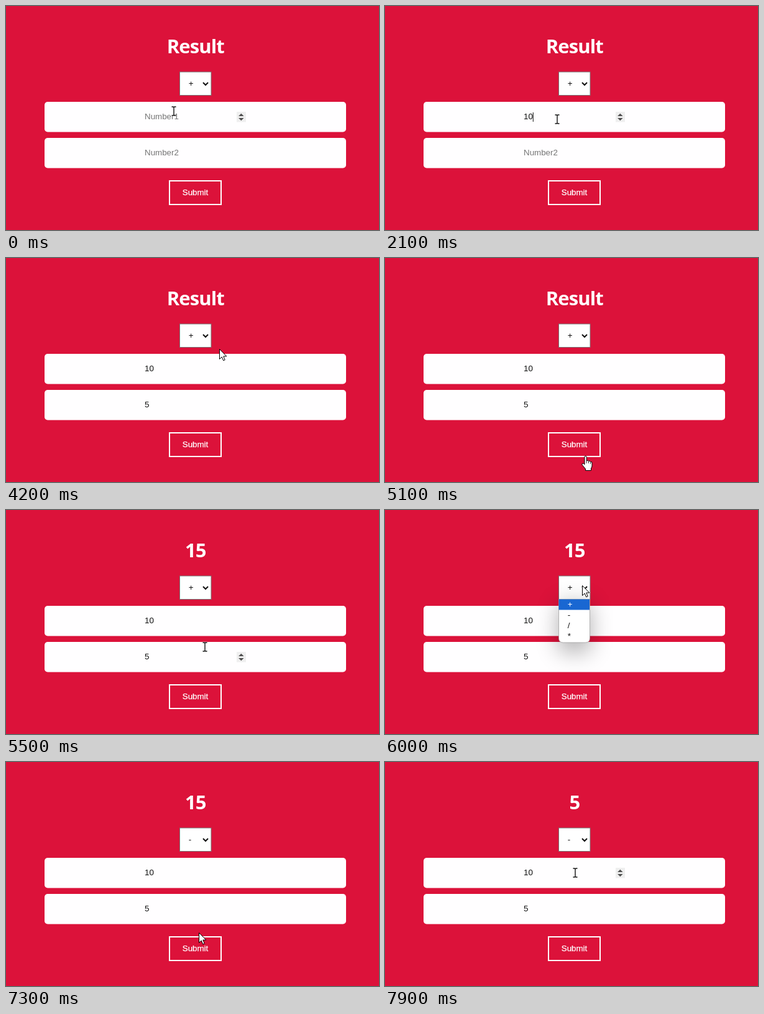
An HTML page that plays this animation: 600 px wide and 360 px high, repeating every 8 s.

```html
<!DOCTYPE html>
<html lang="en">
<head>
<meta charset="utf-8">
<title>Calculator</title>
<style>
  html, body { margin: 0; width: 100%; height: 100%; overflow: hidden; background: #dc123a; }
  svg { display: block; width: 600px; height: 360px; }
  text { font: 13.333px "Liberation Sans", Arial, sans-serif; fill: #111; white-space: pre; }
  #title { font: 700 31px "Open Sans", "Noto Sans", sans-serif; letter-spacing: -.9px; fill: #fff; text-anchor: middle; }
  #submit { fill: #fff; stroke: #fff; stroke-width: .25; }
  .box { fill: #fffeff; }
  .empty { fill: #757575; }
  .shadow { filter: blur(18px); opacity: .33; }
  .outline { stroke: #000; stroke-width: 1; stroke-linejoin: round; fill: #fff; }
  #beam use { fill: none; stroke: #111; stroke-width: 1.4; }
  #beam .halo { stroke: #fff; stroke-width: 2.6; }
</style>
</head>
<body>
<svg viewBox="0 0 600 360">
  <defs>
    <path id="beam-shape" d="M-3.5 -7 H-1 L0 -6 L1 -7 H3.5 M0 -6 V6 M-3.5 7 H-1 L0 6 L1 7 H3.5"/>
  </defs>

  <text id="title" x="304.8" y="76"></text>
  <g id="fields"></g>
  <rect id="caret" width="1" height="15" fill="#111"/>

  <rect x="263" y="281" width="83" height="38" fill="none" stroke="#fff" stroke-width="2"/>
  <text id="submit" x="283.8" y="304.3">Submit</text>

  <rect x="279.5" y="106" width="50.5" height="37.5" fill="#fff" stroke="#767676"/>
  <text id="operator" x="293.8" y="129"></text>
  <path d="M317 123 L321 127 L325 123" fill="none" stroke="#111" stroke-width="2"/>

  <g id="menu">
    <rect class="shadow" x="280" y="151" width="49" height="76"/>
    <path d="M279.5 143.5 H329.5 V206 Q329.5 213 322.5 213 H286.5 Q279.5 213 279.5 206Z" fill="#fff" stroke="#999" stroke-width=".7"/>
    <rect id="highlight" x="279.5" width="49.5" height="17" fill="#1967d2"/>
    <g id="options"></g>
  </g>

  <g id="pointer">
    <g id="beam"><use class="halo" href="#beam-shape"/><use href="#beam-shape"/></g>
    <path id="arrow" class="outline" d="M.5 .5 V16.5 L4.2 13 L6.7 18.8 L9.2 17.7 L6.8 12 H11.8Z"/>
    <g id="hand">
      <path class="outline" d="M-1 2 Q-1 .3 .6 .3 Q2.2 .3 2.2 2 V8 Q4.6 6.6 5.5 8.6 Q7.6 7.4 8.6 9.6 Q11 8.8 11 11.5 V16 Q11 18 9.5 20 V23.5 H.5 V21 L-4.8 14.5 Q-5.6 12.5 -4 12 Q-2.6 11.8 -1 14Z"/>
      <path d="M2.2 8 V12 M5.5 9 V12 M8.6 10 V13" stroke="#000" stroke-width=".8"/>
    </g>
  </g>
</svg>
<script>
const $ = id => document.getElementById(id);
const LOOP = 8000, STEP = 100, BLINK = 500;
const ROW = 17, FIELD_TOP = 154, FIELD_GAP = 58, TEXT_X = 223, DIGIT = 7.4;

const operations = {
  "+": (a, b) => a + b,
  "-": (a, b) => a - b,
  "/": (a, b) => a / b,
  "*": (a, b) => a * b
};

// Each move eases the pointer to a point between two times
const home = { x: 270, y: 169 };
const moves = [
  { from: 1100, to: 1400, x: 277, y: 182 },
  { from: 2500, to: 3200, x: 292, y: 239 },
  { from: 3700, to: 4000, x: 415, y: 214 },
  { from: 4000, to: 4300, x: 318, y: 122 },
  { from: 4500, to: 5000, x: 322, y: 318 },
  { from: 5300, to: 5700, x: 317, y: 121 },
  { from: 6200, to: 6700, x: 312, y: 160 },
  { from: 6800, to: 7500, x: 310, y: 302 },
  { from: 7600, to: 7900, x: 306, y: 178 }
];

const focus = (s, field) => s.focus = field;
const type = (s, digit) => s.values[s.focus] += digit;
const open = s => s.open = true;
const choose = (s, sign) => { s.operator = sign; s.open = false; };
const submit = s => {
  s.title = operations[s.operator](...s.values.map(Number));
  s.focus = null;
};
const script = [
  [1200, focus, 0], [1900, type, "1"], [2100, type, "0"],
  [3100, focus, 1], [3400, type, "5"], [5400, submit],
  [5900, open], [7000, choose, "-"], [7700, submit]
];

function stateAt(t) {
  const state = { title: "Result", operator: "+", values: ["", ""], focus: null, open: false, since: 0 };
  for (const [time, action, value] of script) {
    if (time > t) break;
    action(state, value);
    state.since = time;
  }
  return state;
}

function pointAt(t) {
  let { x, y } = home;
  for (const move of moves) {
    const k = Math.min(1, Math.max(0, (t - move.from) / (move.to - move.from)));
    const eased = k * k * (3 - 2 * k);
    x += (move.x - x) * eased;
    y += (move.y - y) * eased;
  }
  return [Math.round(x), Math.round(y)];
}

const show = (id, on) => $(id).setAttribute("visibility", on ? "inherit" : "hidden");
const inside = (x, y, left, top, width, height) =>
  x >= left && x <= left + width && y >= top && y <= top + height;

$("fields").innerHTML = [0, 1].map(i => `
  <g transform="translate(0 ${FIELD_TOP + i * FIELD_GAP})">
    <rect class="box" x="62" width="485" height="48.5" rx="5"/>
    <text id="value${i}" x="${TEXT_X}" y="28.4"></text>
    <g id="spinner${i}">
      <rect x="371" y="16" width="15" height="16.5" fill="#efefef"/>
      <path d="M374 23 L378.3 18.8 L382.6 23Z M374 26 L378.3 30.2 L382.6 26Z" fill="#505050"/>
    </g>
  </g>`).join("");

$("options").innerHTML = Object.keys(operations).map((sign, i) =>
  `<text x="293.8" y="${155.6 + i * ROW}">${sign}</text>`).join("");

function drawFields({ values, focus, since }, t) {
  values.forEach((value, i) => {
    $("value" + i).textContent = value || "Number" + (i + 1);
    $("value" + i).classList.toggle("empty", !value);
  });
  const focused = focus !== null;
  show("caret", focused && Math.floor((t - since) / BLINK) % 2 === 0);
  if (focused) {
    $("caret").setAttribute("x", TEXT_X + values[focus].length * DIGIT);
    $("caret").setAttribute("y", FIELD_TOP + 17 + focus * FIELD_GAP);
  }
}

function drawMenu(isOpen, y) {
  const row = y > 160 ? 1 : 0;
  show("menu", isOpen);
  $("highlight").setAttribute("y", 143.5 + row * ROW);
  [...$("options").children].forEach((option, i) => option.style.fill = i === row ? "#fff" : "#111");
}

function drawPointer(x, y, isOpen) {
  const overField = [0, 1].map(i => !isOpen && inside(x, y, 62, FIELD_TOP + i * FIELD_GAP, 485, 49));
  const overText = overField.includes(true);
  const overButton = inside(x, y, 262, 280, 85, 40);
  overField.forEach((over, i) => show("spinner" + i, over));
  show("beam", overText);
  show("hand", overButton);
  show("arrow", !overText && !overButton);
  $("pointer").setAttribute("transform", `translate(${x} ${y})`);
}

function draw(now) {
  const t = Math.floor(now % LOOP / STEP) * STEP;
  const state = stateAt(t), [x, y] = pointAt(t);
  $("title").textContent = state.title;
  $("operator").textContent = state.operator;
  drawFields(state, t);
  drawMenu(state.open, y);
  drawPointer(x, y, state.open);
}

const start = performance.now();
function tick() {
  draw(performance.now() - start);
  requestAnimationFrame(tick);
}
tick();
</script>
</body>
</html>
```
